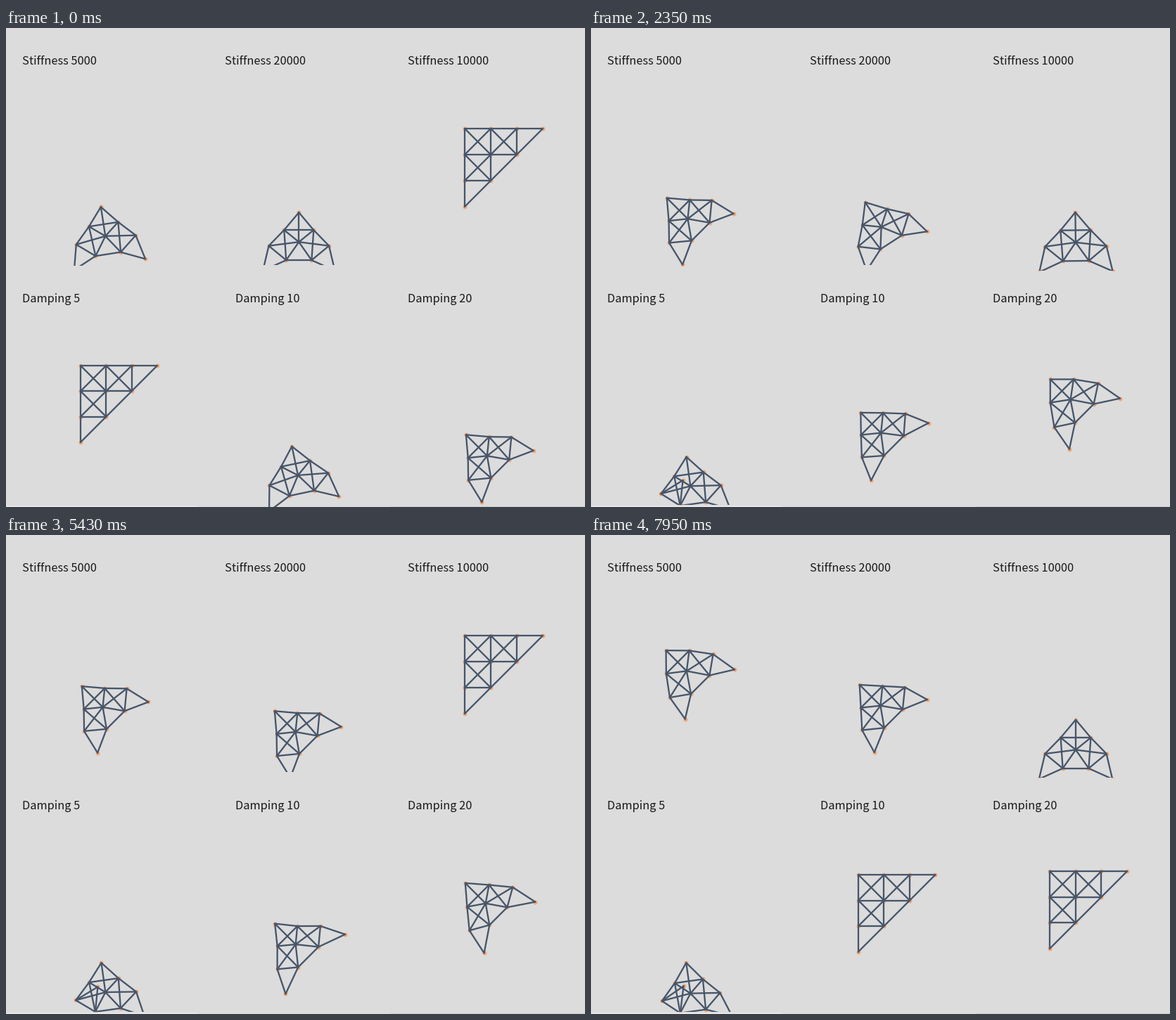
A matplotlib script that plays this animation: 823 by 681 pixels, repeating every 8000 ms.

```python
import numpy as np
import matplotlib.pyplot as plt
from matplotlib.animation import FuncAnimation
from matplotlib.collections import LineCollection
from matplotlib.patches import Rectangle

W, H, DPI = 823, 681, 100
PX = 72 / DPI
STEP, LOOP = 50, 8000
BG, BAR, JOINT, INK = "#dcdcdc", "#46556a", "#f2a673", "#1a1a1a"
HALF_G = 4.64e-4   # half of gravity, px / ms^2
DROP = 204         # floor below the resting corner, px

NODES = [(i, j) for j in range(4) for i in range(4 - j)]
INDEX = {n: k for k, n in enumerate(NODES)}
EDGES = [(INDEX[a], INDEX[b])
         for i, j in NODES
         for a, b in (((i, j), (i + 1, j)), ((i, j), (i, j + 1)),
                      ((i, j), (i + 1, j + 1)), ((i + 1, j), (i, j + 1)))
         if a in INDEX and b in INDEX]
GRID = np.array(NODES, float)
SIDE, HYP, TIP = INDEX[0, 2], INDEX[1, 2], INDEX[0, 3]


def vibrate(stiffness, damping, steps):
    """Free vibration, one entry per ms; every spring has rest length 1."""
    ends = np.zeros((len(EDGES), len(NODES)))
    for k, (a, b) in enumerate(EDGES):
        ends[k, a], ends[k, b] = -1, 1
    pos, vel, dt = GRID.copy(), np.zeros_like(GRID), 1e-3
    keep = np.exp(-0.6 * damping * dt)
    history = []
    for _ in range(steps):
        history.append(pos.copy())
        d = ends @ pos
        length = np.hypot(d[:, 0], d[:, 1])[:, None]
        vel = (vel - 0.2 * stiffness * dt * ends.T @ (d - d / length)) * keep
        pos = pos + vel * dt
    return np.array(history)


def reflect(p, a, b):
    """Mirror p in the line through a and b."""
    along = (b - a) / np.hypot(*(b - a))
    return 2 * (a + along * np.dot(p - a, along)) - p


class Truss:
    def __init__(self, ax, origin, pitch, floor_clip, stiffness, damping,
                 start, period, reset, bounce, topple, lean=45, folds=False):
        self.origin = np.array(origin, float)
        self.start, self.period, self.reset = start, period, reset
        self.bounce, self.topple = bounce, topple
        self.lean, self.folds = lean, folds
        self.shapes = vibrate(stiffness, damping, reset) * pitch
        self.impact = np.sqrt((DROP - 2.68 * pitch) / HALF_G)
        clip = Rectangle((0, 0), W, floor_clip, transform=ax.transData)
        self.joints, = ax.plot([], [], "o", ms=6 * PX, mew=0, color=JOINT, zorder=2)
        self.bars = LineCollection([], colors=BAR, linewidths=2.3 * PX,
                                   capstyle="round", zorder=3)
        ax.add_collection(self.bars)
        self.joints.set_clip_path(clip)
        self.bars.set_clip_path(clip)

    def hop(self, tau):
        dt = max(0, tau - self.impact)
        return max(0, HALF_G * dt * (2 * self.bounce * self.impact - dt))

    def points(self, t):
        tau = (t - self.start) % self.period
        if tau >= self.reset:
            tau = 0
        begin, end = self.topple
        tilt = np.sin(np.pi / 2 * np.clip((tau - begin) / (end - begin), 0, 1))
        angle = np.radians(self.lean * tilt)
        c, s = np.cos(angle), np.sin(angle)

        # the centre of mass falls straight down; the body turns about it
        pts = self.shapes[int(tau)]
        centre = pts.mean(axis=0)
        pts = (pts - centre) @ np.array([[c, s], [-s, c]]) + centre
        if self.folds:
            tucked = reflect(pts[TIP], pts[SIDE], pts[HYP])
            pts[TIP] += tilt * (tucked - pts[TIP])

        shift = DROP - self.hop(tau) - pts[:, 1].max()
        if tau < self.impact:
            shift = min(shift, HALF_G * tau**2)
        return pts + self.origin + (0, shift)

    def draw(self, t):
        p = self.points(t)
        self.joints.set_data(p[:, 0], p[:, 1])
        self.bars.set_segments([p[[a, b]] for a, b in EDGES])


fig = plt.figure(figsize=(W / DPI, H / DPI), dpi=DPI, facecolor=BG)
ax = fig.add_axes([0, 0, 1, 1])
ax.set_xlim(0, W)
ax.set_ylim(H, 0)
ax.axis("off")

ax.add_patch(Rectangle((0, 679), 272, 2, color="#e6e6e6", lw=0, zorder=1))
ax.add_patch(Rectangle((547, 680), 276, 1, color="#c9c9c9", lw=0, zorder=1))

for x, y, label in ((23.5, 52, "Stiffness 5000"), (311.5, 52, "Stiffness 20000"),
                    (571, 52, "Stiffness 10000"), (23.5, 389.5, "Damping 5"),
                    (326.5, 389.5, "Damping 10"), (571, 390.5, "Damping 20")):
    ax.text(x, y, label, family="Noto Sans CJK JP", size=16.4 * PX,
            color=INK, va="baseline", zorder=4)

trusses = [
    Truss(ax, (106, 140), 36.3, 338, stiffness=5000, damping=20, start=1315,
          period=3205, reset=2350, bounce=0.61, topple=(1219, 2347)),
    Truss(ax, (380, 141), 36.3, 337, stiffness=20000, damping=20, start=1121,
          period=3220, reset=2220, bounce=0.5, topple=(1110, 1800)),
    Truss(ax, (652, 143), 37, 345, stiffness=10000, damping=20, start=538,
          period=2692, reset=2035, bounce=0.35, topple=(485, 1980)),
    Truss(ax, (106, 480), 36.3, 678, stiffness=5000, damping=5, start=268,
          period=3250, reset=2450, bounce=0.626, topple=(1085, 1180),
          lean=37, folds=True),
    Truss(ax, (380, 483), 36.5, 681, stiffness=5000, damping=10, start=1989,
          period=3030, reset=2050, bounce=0.4, topple=(875, 1191)),
    Truss(ax, (652, 478), 36.7, 680, stiffness=5000, damping=20, start=2139,
          period=3075, reset=2300, bounce=0.52, topple=(1175, 2300)),
]


def update(frame):
    for truss in trusses:
        truss.draw(frame * STEP)
    return []


anim = FuncAnimation(fig, update, frames=LOOP // STEP, interval=STEP,
                     repeat=True, repeat_delay=0, blit=False)
plt.show()
```
